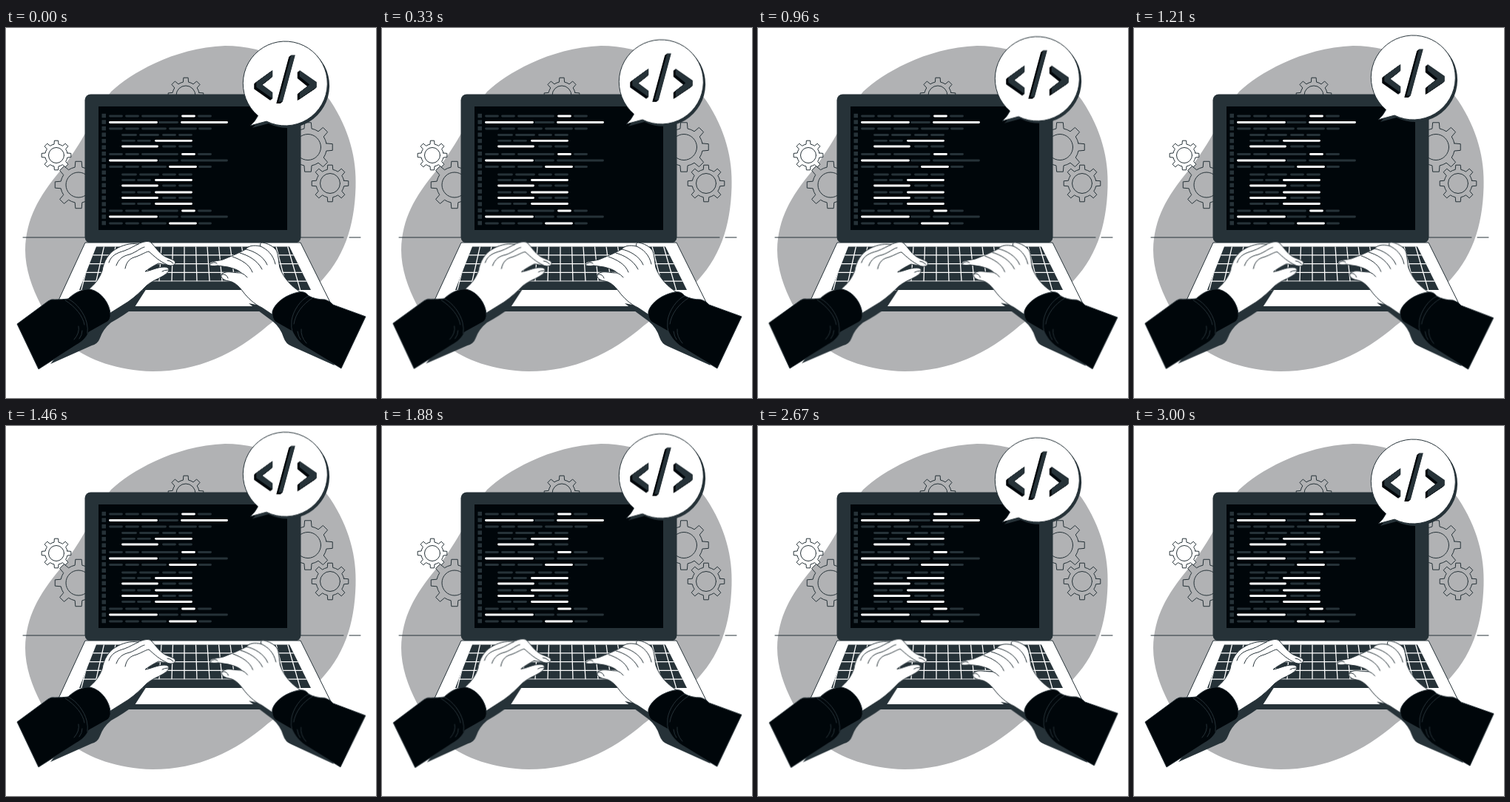
These frames come from a looping animation (500 px wide and 500 px high, 3040 ms). An HTML page:

```html
<!DOCTYPE html>
<html lang="en">
<head>
<meta charset="utf-8">
<title>Typing on a laptop</title>
<style>
  html, body { margin: 0; width: 100%; height: 100%; overflow: hidden; background: #fff; }
  svg { display: block; width: 100vw; height: 100vh; }
  .slate { fill: #263238; }
  .ink { fill: #00060a; }
  .line { fill: none; stroke: #263238; stroke-width: 1; stroke-linecap: round; stroke-linejoin: round; }
  .skin { fill: #fff; stroke: #263238; stroke-width: 1; stroke-linejoin: round; }
  .sleeve { fill: #00060a; stroke: #263238; stroke-width: 1; stroke-linejoin: round; }
  #code path { fill: none; stroke-width: 2.8; stroke-linecap: round; }
  #bubble { animation: float 3040ms linear infinite; }
  #left { transform-origin: 122px 375px; animation: sway 3040ms linear infinite; }
  #right { transform-origin: 380px 375px; animation: late-sway 3040ms linear infinite; }

  /* 3000 ms cycles followed by a 40 ms hold */
  @keyframes float {
    0%, 98.684%, 100% { transform: translateY(0); }
    49.342% { transform: translateY(-10px); }
  }
  @keyframes sway {
    0%, 98.684%, 100% { transform: rotate(0deg); }
    24.671% { transform: rotate(1deg); }
    74.013% { transform: rotate(-1deg); }
  }
  /* same sway, started 500 ms later and cut at the loop end */
  @keyframes late-sway {
    0%, 16.447% { transform: rotate(0deg); }
    41.118% { transform: rotate(1deg); }
    90.461% { transform: rotate(-1deg); }
    98.684%, 100% { transform: rotate(-.667deg); }
  }
</style>
</head>
<body>
<svg viewBox="0 0 500 500">
  <defs>
    <path id="panel" d="M122 295.500H383L412 354H99Z"/>
    <clipPath id="panel-clip"><use href="#panel"/></clipPath>
    <path id="balloon" d="M340.500 118.530Q337 126 330 132L352 126.080A57 57 0 1 0 340.500 118.530Z"/>
  </defs>

  <path fill="#b1b2b4" d="M296 24C352 24 405 50 438 98C464 137 474 177 472.500 215C471 268 457 312 420 348C398 369 376 385 354 402C310 440 260 464 198 464C150 463 112 448 88 430C62 405 26 350 26 300C27 258 44 228 74 192C104 155 118 118 142 86C168 62 225 27 296 24Z"/>
  <g id="gears"></g>
  <path class="line" d="M23 283H456M464 283H479"/>

  <!-- laptop -->
  <rect class="slate" x="106.500" y="89.500" width="292" height="201" rx="8"/>
  <rect class="ink" x="125" y="106" width="255" height="167"/>
  <g id="code"></g>
  <path class="slate" d="M67 375H442V379Q442 383 436 383H73Q67 383 67 379Z"/>
  <path class="skin" d="M107 290H398L441 376.500H67Z"/>
  <use href="#panel" class="slate"/>
  <path id="keys" clip-path="url(#panel-clip)" fill="none" stroke="#fff" stroke-width="1.300"/>
  <path class="slate" d="M186 342.500H322L324 354H184Z"/>

  <g id="left">
    <path class="slate" d="M60 454L116 429Q124 427 127 419Q131 407 142 398Q160 388 174 377L190 352L140 372L90 415Z"/>
    <path class="skin" d="M104 358C117 351 126 340 130 328C132 315 139 304 148 299C156 294 168 290 178 292C185 289 192 287 196 290C202 296 205 302 212 307C217 311 225 312 228 315C230 319 227 321 222 321L206 318C200 321 193 325 188 329C196 328 204 323 214 323Q220 323 220 327C219 332 212 335 207 338C200 341 195 344 190 348C182 356 175 363 165 370L138 387Z"/>
    <path class="line" d="M139 317C142 307 150 304 160 301C168 298 174 294 179 292M149 321C152 312 158 308 167 306C176 303 182 297 187 296M161 325C163 315 168 311 176 309C184 306 190 302 193 302C201 309 207 315 218 320M218 314Q222 314 226 318M211 329Q214 327 219 327"/>
    <path class="sleeve" d="M15 400L57 369Q61 366 66 367Q76 367 84 366C92 358 104 352 114 353C130 357 140 373 141 386Q142 393 137 397L112 411C108 419 103 424 94 429L44 461Z"/>
    <path class="line" d="M84 366C96 372 106 386 109 398Q111 406 110 413M80 368C94 377 104 389 106 401M98 403Q100 412 92 421M103 409Q103 415 99 420"/>
  </g>

  <g id="right">
    <path class="slate" d="M328 372Q346 386 360 396Q371 405 375 418Q378 427 386 430L444 456L425 420L370 380Z"/>
    <path class="skin" d="M400 358C386 350 375 338 370 324C368 314 368 305 365 300C361 295 354 291 346 290Q342 291 344 295C335 293 328 294 324 299C315 304 303 309 293 313C285 315 277 315 275 318C274 322 280 322 286 321L300 323C308 325 314 327 318 331C309 331 303 329 297 330Q291 331 291 334C290 338 295 341 301 342C308 343 314 348 320 356C326 364 335 373 346 378L364 390Z"/>
    <path class="line" d="M344 295C353 299 361 306 364 319M324 299C334 301 348 308 353 320M316 304C327 307 340 314 346 326M306 309C317 313 329 319 333 330M276 319Q281 315 285 318M318 331Q323 333 326 337M292 333Q298 332 300 338"/>
    <path class="sleeve" d="M486 390L442 374Q438 369 431 367Q418 367 409 362Q404 355 395 357C380 360 364 370 360 383Q359 392 364 397L387 410C391 418 396 425 405 431L453 460Z"/>
    <path class="line" d="M409 362C398 367 388 382 386 395Q385 405 387 411M414 365C401 373 391 386 389 400M399 407Q398 417 406 426M394 410Q395 417 398 421"/>
  </g>

  <g id="bubble">
    <use href="#balloon" class="slate" transform="translate(2.800 3)"/>
    <use href="#balloon" class="skin"/>
    <g id="mark"></g>
  </g>
</svg>
<script>
  const $ = id => document.getElementById(id);
  const add = (parent, tag, attrs) => {
    const el = document.createElementNS('http://www.w3.org/2000/svg', tag);
    for (const k in attrs) el.setAttribute(k, attrs[k]);
    parent.append(el);
  };

  // Eight-toothed gear with a hub ring
  function gear(x, y, r, hub, fill) {
    const at = (rad, a) => `${(x + rad * Math.cos(a)).toFixed(2)} ${(y + rad * Math.sin(a)).toFixed(2)}`;
    const root = r * 0.76;
    const arc = `A${root} ${root} 0 0 1 `;
    let d = '';
    for (let i = 0; i < 8; i++) {
      const a = i * Math.PI / 4;
      d += `${i ? arc : 'M'}${at(root, a - .2)}L${at(r, a - .13)}L${at(r, a + .13)}L${at(root, a + .2)}`;
    }
    d += `${arc}${at(root, -.2)}Z`;
    add($('gears'), 'path', { d, class: 'line', style: `fill:${fill}` });
    add($('gears'), 'circle', { cx: x, cy: y, r: hub, class: 'line' });
  }
  const gray = '#b1b2b4';
  gear(98, 212, 32, 17, gray);
  gear(68, 172, 20, 10.5, '#fff');
  gear(243, 91, 24, 13, gray);
  gear(408, 161, 33.5, 17.5, gray);
  gear(438, 210, 25, 13.5, gray);

  // Code rows: segment edges, and which segments are white
  const short = [139, 158, 161, 180, 183, 217, 220, 258, 260, 278];
  const head = [139, 158, 161, 180, 183, 233, 237, 256, 259, 278];
  const long = [139, 205, 206, 233, 236, 300];
  const inner = [156, 177, 180, 207, 211, 230, 233, 252];
  const tail = [156, 175, 177, 196, 201, 252];
  const lead = [156, 206, 211, 230, 233, 252];
  const rows = [
    [119, head, [3]], [127.5, long, [0, 2]], [136, short, []],
    [144.5, inner, []], [152.3, tail, [2]], [160, lead, [0]],
    [170.5, head, [3]], [179, long, [0]], [187.5, short, [3]],
    [198, inner, []], [205.5, tail, [2]], [213, lead, [0]],
    [222, tail, [2]], [229.5, lead, [0]], [237.5, tail, [2]],
    [247, head, [3]], [255, long, [0]], [264, short, [3]]
  ];
  rows.forEach(([y, edges, bright], n) => {
    add($('code'), 'rect', { x: 129.5, y: 115.8 + n * 8.53, width: 5.5, height: 5.5, class: 'slate' });
    for (let i = 0; i < edges.length / 2; i++)
      add($('code'), 'path', {
        d: `M${edges[2 * i] + 1.5} ${y}H${edges[2 * i + 1] - 1.5}`,
        stroke: bright.includes(i) ? '#fff' : '#263238'
      });
  });

  // Keyboard grid, fanning out from an upright line
  let grid = '';
  for (let y = 306.8; y < 345; y += 11.8) grid += `M90 ${y}H420`;
  for (let i = -8; i < 10; i++) grid += `M${241 + i * 15.5} 295L${241 + i * 17.4} 354`;
  $('keys').setAttribute('d', grid);

  // Code sign: dark extrusion under slate faces
  const sign = 'M361 56.500V65L347 76L361 86.500V95L339 79.500V72.500Z' +
    'M386 36H391.500L374.500 99H369Z' +
    'M397.500 56.500V65L411 76L397.500 86.500V95L420.500 79.500V72.500Z';
  for (let i = 6; i >= 0; i--)
    add($('mark'), 'path', {
      d: sign, class: i ? 'ink' : 'slate',
      transform: `translate(${-.7 - i * .5} ${.6 + i * .4})`
    });
</script>
</body>
</html>
```
